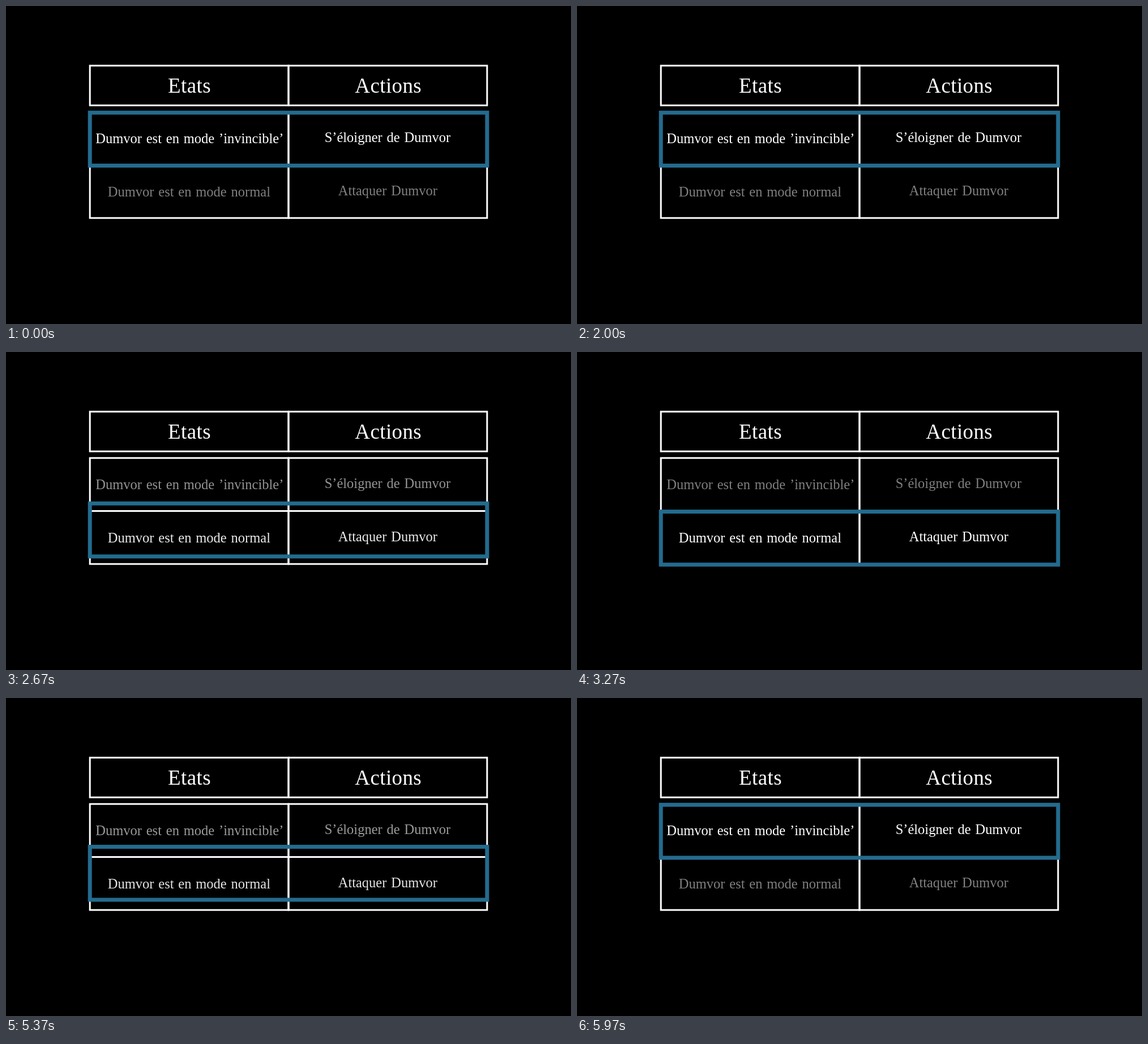
Write an HTML page that moves like this. It is 998 by 561 pixels and loops after 6.01 s.

```html
<!DOCTYPE html>
<html lang="fr">
<head>
<meta charset="utf-8">
<title>Etats et actions</title>
<style>
  html, body { margin: 0; width: 100%; height: 100%; overflow: hidden; background: #000; }
  svg { display: block; width: 100vw; height: 100vh; }
  rect { fill: none; stroke: #fff; stroke-width: 3; }
  #cursor { stroke: #236b8e; stroke-width: 7; }
  text {
    font: 24.5px "Liberation Serif", "Times New Roman", serif;
    word-spacing: .07em;
    text-anchor: middle;
    fill: #fff;
  }
  .head { font-size: 37px; letter-spacing: .01em; }
</style>
</head>
<body>
<svg viewBox="0 0 998 561">
  <g id="cells"></g>
  <text class="head" x="324" y="152.5">Etats</text>
  <text class="head" x="675.2" y="152.8">Actions</text>
  <g id="row1">
    <text x="324.3" y="242">Dumvor est en mode ’invincible’</text>
    <text x="673.9" y="239.8">S’éloigner de Dumvor</text>
  </g>
  <g id="row2">
    <text x="323.4" y="335.5">Dumvor est en mode normal</text>
    <text x="674.3" y="333.6">Attaquer Dumvor</text>
  </g>
  <rect id="cursor" x="148.2" y="188.1" width="701.6" height="93.5"/>
</svg>
<script>
const LOOP = 6010, FPS = 30, ROW_H = 93.5, DIM = 0.5;
const $ = id => document.getElementById(id);

// Table outline: [top, height] of each row, two cells per row
for (const [y, h] of [[105.2, 70.1], [187, ROW_H], [187 + ROW_H, ROW_H]]) {
  for (const x of [148.2, 499]) {
    const cell = document.createElementNS("http://www.w3.org/2000/svg", "rect");
    const box = { x, y, width: 350.8, height: h };
    for (const key in box) cell.setAttribute(key, box[key]);
    $("cells").append(cell);
  }
}

// Sigmoid ease, rescaled to run from 0 to 1
const sigmoid = x => 1 / (1 + Math.exp(-x));
const edge = sigmoid(-5);
function smooth(a) {
  const u = Math.min(1, Math.max(0, a));
  return (sigmoid(10 * (u - 0.5)) - edge) / (1 - 2 * edge);
}

function shade(id, level) {
  const v = Math.round(255 * level);
  $(id).querySelectorAll("text").forEach(t => t.style.fill = `rgb(${v},${v},${v})`);
}

function draw(now) {
  // Steps of 1/30 s, with times rounded to 10 ms
  const sec = Math.floor((now % LOOP + 3.4) * FPS / 1000) / FPS;
  const p = smooth(sec - 2) - smooth(sec - 5);
  $("cursor").setAttribute("y", 188.1 + ROW_H * p);
  shade("row1", 1 - (1 - DIM) * p);
  shade("row2", DIM + (1 - DIM) * p);
}

const start = performance.now();
function tick() {
  draw(performance.now() - start);
  requestAnimationFrame(tick);
}
tick();
</script>
</body>
</html>
```
